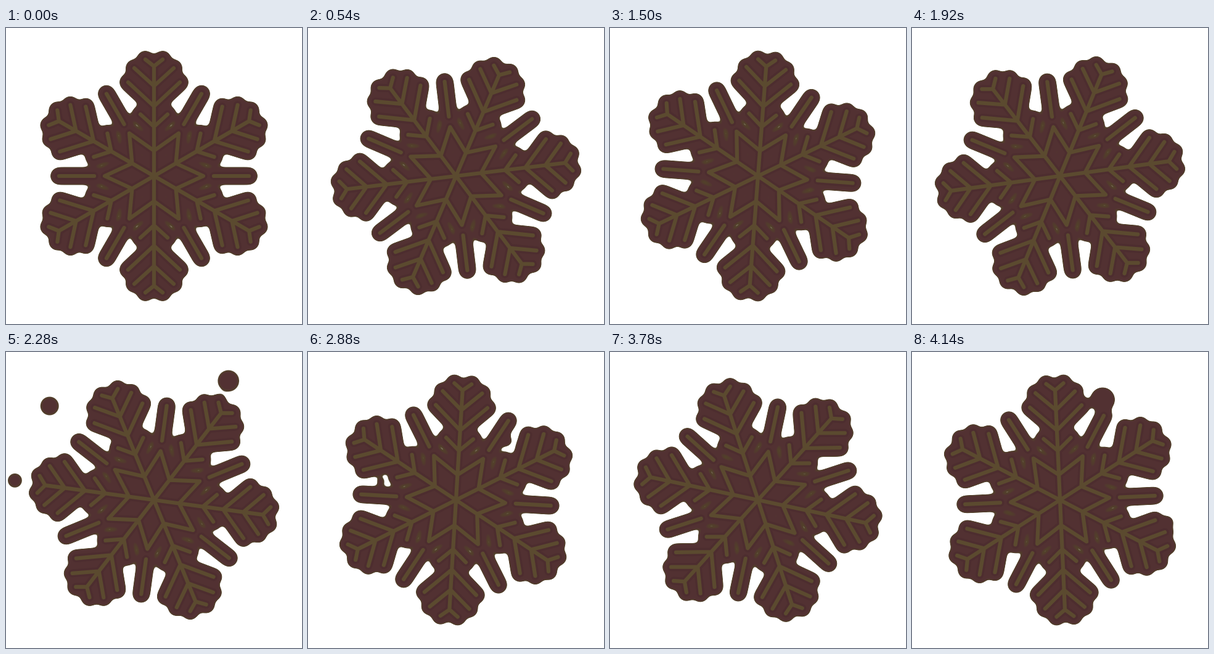
An HTML page with a canvas that plays this animation: 480 px wide and 480 px high, repeating every 4200 ms.

```html
<!DOCTYPE html>
<html>
<head>
<meta charset="utf-8">
<style>
html, body { margin: 0; width: 100%; height: 100%; overflow: hidden; background: #fff; }
canvas { position: absolute; left: 0; top: 0; width: 480px; height: 480px; }
#body { filter: url(#goo); }
</style>
</head>
<body>
<svg width="0" height="0" style="position:absolute">
  <!-- Merges nearby shapes: an olive rim that turns maroon towards the inside. -->
  <filter id="goo" x="0" y="0" width="1" height="1" color-interpolation-filters="sRGB">
    <feGaussianBlur in="SourceAlpha" stdDeviation="4" result="soft"/>
    <feColorMatrix in="soft" values="0 0 0 0 .32  0 0 0 0 .26  0 0 0 0 .16  0 0 0 14 -6.5" result="rim"/>
    <feColorMatrix in="soft" values="0 0 0 0 .322  0 0 0 0 .192  0 0 0 0 .196  0 0 0 5 -2.6" result="core"/>
    <feMerge><feMergeNode in="rim"/><feMergeNode in="core"/></feMerge>
  </filter>
</svg>
<canvas id="body" width="480" height="480"></canvas>
<canvas id="lines" width="480" height="480"></canvas>
<script>
const LOOP = 4200, STEP = 60, SPEED = 0.34, RAD = Math.PI / 180;
const [body, lines] = ['body', 'lines'].map(id => document.getElementById(id).getContext('2d'));

// The flake is six equal sectors, each drawn pointing up.
const flake = new Path2D(), star = new Path2D();

function addLine(path, angle, ...points) {
  const c = Math.cos(angle), s = Math.sin(angle);
  points.forEach(([x, y], i) => path[i ? 'lineTo' : 'moveTo'](x * c - y * s, x * s + y * c));
}

for (let i = 0; i < 6; i++) {
  const arm = i * 60 * RAD, gap = arm + 30 * RAD;
  const addFork = (base, width, rise) =>
    addLine(flake, arm, [-width, -base - rise], [0, -base], [width, -base - rise]);
  addLine(flake, arm, [0, 0], [0, -178]);
  addFork(178, 14, 11);
  addFork(146, 32, 29);
  addFork(113, 42, 39);
  addFork(80, 22, 20);
  addLine(flake, gap, [0, -97], [0, -154]);
  for (const path of [flake, star]) addLine(path, gap, [-20.5, -35.5], [0, -80], [20.5, -35.5]);
  addLine(star, gap, [-20.5, -35.5], [0, 0], [20.5, -35.5], [0, -80], [-20.5, -35.5]);
}

// Bursts of drops from the centre: birth time, then [direction, size] pairs.
const bursts = [
  [1610, [[-172, 12], [-138, 15], [-58, 17]]],
  [2510, [[-166, 11], [-50, 16]]],
  [3620, [[-67, 23], [12, 13]]]
];

function drawDrops(t) {
  for (const [birth, drops] of bursts) {
    const d = (t - birth) * SPEED;
    if (d <= 0 || d > 330) continue;
    body.globalAlpha = Math.min(1, (330 - d) / 130);
    for (const [direction, size] of drops) {
      body.beginPath();
      body.arc(240 + d * Math.cos(direction * RAD), 240 + d * Math.sin(direction * RAD), size * d / 200, 0, 7);
      body.fill();
    }
  }
  body.globalAlpha = 1;
}

function strokeFlake(ctx, width, color) {
  ctx.lineWidth = width;
  ctx.strokeStyle = color;
  ctx.stroke(flake);
}

function draw(now) {
  const t = Math.floor(now % LOOP / STEP) * STEP;
  for (const ctx of [body, lines]) {
    ctx.resetTransform();
    ctx.clearRect(0, 0, 480, 480);
    ctx.lineCap = ctx.lineJoin = 'round';
  }
  drawDrops(t);
  for (const ctx of [body, lines]) {
    ctx.translate(240, 240);
    ctx.rotate(t / LOOP * Math.PI);
  }
  body.fill(star);
  strokeFlake(body, 29, '#000');
  strokeFlake(lines, 13, '#4d2d2f');
  strokeFlake(lines, 6.2, '#5b4a2f');
}

const start = performance.now();
function tick() {
  draw(performance.now() - start);
  requestAnimationFrame(tick);
}
tick();
</script>
</body>
</html>
```
